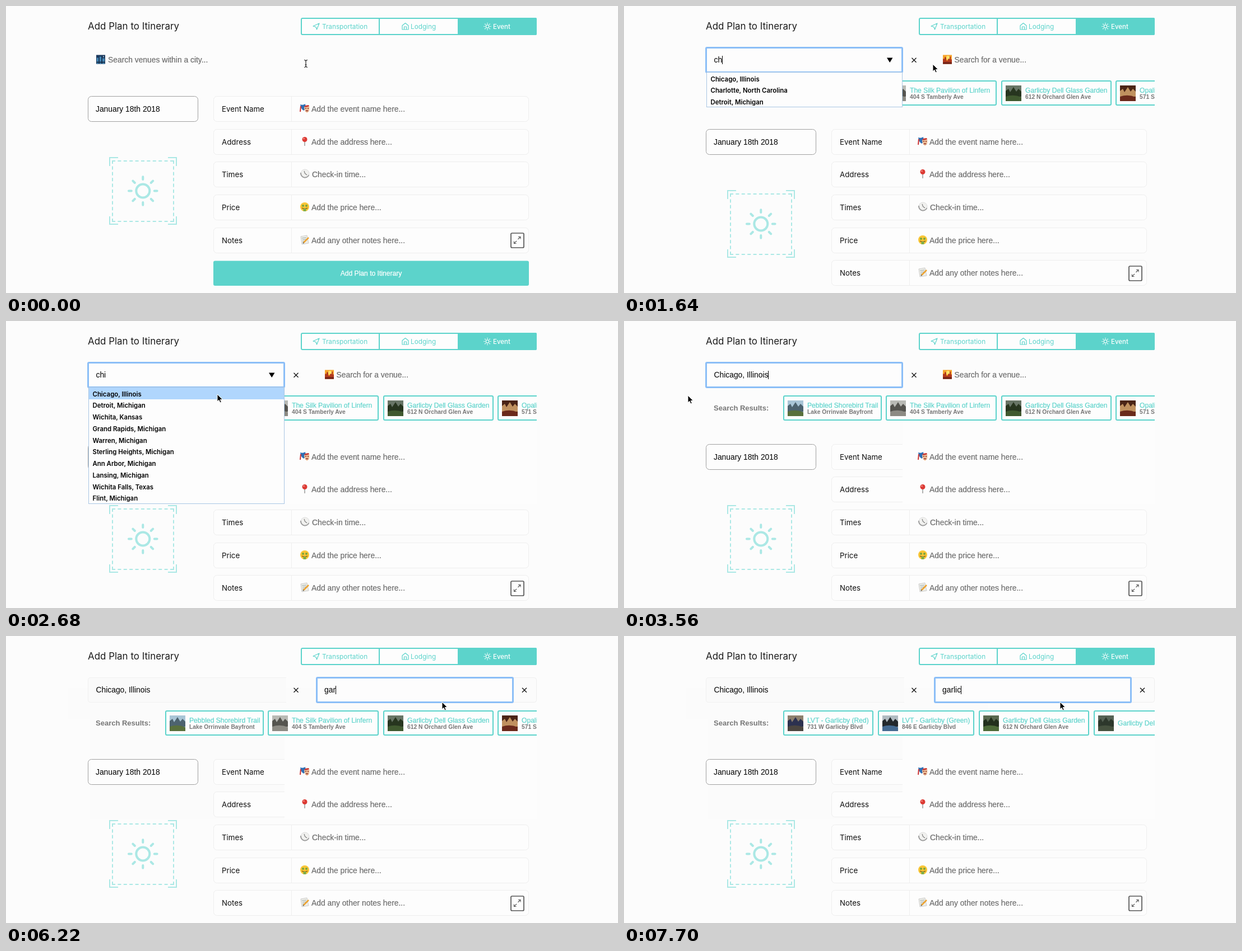
Write an HTML page that moves like this. It is 1092 px wide and 513 px high and loops after 8000 ms.

```html
<!DOCTYPE html>
<html lang="en">
<head>
<meta charset="utf-8">
<title>Add Plan to Itinerary</title>
<style>
  html, body { margin: 0; width: 100%; height: 100%; overflow: hidden; background: #fcfcfc; }
  svg { display: block; }
  text { font: 13.85px "Liberation Sans", Arial, sans-serif; white-space: pre; }
  .title { font: 16.95px Inter, sans-serif; fill: #1c1c1c; }
  .label { font: 13.3px Inter, sans-serif; fill: #111; }
  .tab { font: 11.75px Inter, sans-serif; fill: #5cd3cb; }
  .tab.on { font-weight: 500; font-size: 11.5px; fill: #fff; }
  .hint { fill: #6c6c6c; stroke: #6c6c6c; stroke-width: .2; }
  .results { font-size: 13px; font-weight: bold; fill: #777; }
  .name { font-size: 12.1px; fill: #5cd3cb; stroke: #5cd3cb; stroke-width: .2; }
  .place { font-size: 10.3px; font-weight: bold; fill: #777; }
  .option { font: 600 11.4px Inter, sans-serif; fill: #000; }
  .submit { font-size: 12.1px; fill: #fff; stroke: #fff; stroke-width: .25; text-anchor: middle; }
</style>
</head>
<body>
<svg id="stage" width="1092" height="513" viewBox="0 0 1092 513"></svg>
<script>
const LOOP = 8000, TEAL = '#5cd3cb', PALE = '#abe8e5', PAPER = '#fdfdfd';
const stage = document.getElementById('stage');
const pen = document.createElement('canvas').getContext('2d');
pen.font = '13.85px "Liberation Sans", Arial, sans-serif';

// Drawing helpers
const rect = (x, y, w, h, fill, more = '') =>
  `<rect x="${x}" y="${y}" width="${w}" height="${h}" fill="${fill}" ${more}/>`;
const line = (d, color, width = 1, more = '') =>
  `<path d="${d}" fill="none" stroke="${color}" stroke-width="${width}" ${more}/>`;
const shape = (d, fill, more = '') => `<path d="${d}" fill="${fill}" ${more}/>`;
const dot = (x, y, r, fill, more = '') =>
  `<circle cx="${x}" cy="${y}" r="${r}" fill="${fill}" ${more}/>`;
const text = (x, y, s, cls = '') =>
  `<text x="${x}" y="${y}" class="${cls}">${s.replace(/&/g, '&amp;')}</text>`;
const move = (x, y, body) => `<g transform="translate(${x} ${y})">${body}</g>`;
const round = 'stroke-linecap="round" stroke-linejoin="round"';

// Last value in the table whose time has come
const step = (t, table) => table.filter(([at]) => at <= t).pop()[1];

// Top of a form row, on whole pixels
const rowY = n => 161.5 + Math.round(n * 58.67);

function sun(x, y, r, inner, outer, color, width) {
  let rays = '';
  for (let i = 0; i < 8; i++) {
    const c = Math.cos(i * Math.PI / 4), s = Math.sin(i * Math.PI / 4);
    rays += `M${c * inner} ${s * inner}L${c * outer} ${s * outer}`;
  }
  return move(x, y, dot(0, 0, r, 'none', `stroke="${color}" stroke-width="${width}"`) +
    line(rays, color, width, round));
}

// Small pictures in a 16 px box
const icons = {
  night: rect(0, 0, 16, 16, '#1c3a5e') + shape('M1 16V5h3v11M6 16V3h3v13M11 16V6h4v10', '#4588b5') +
    line('M0 13H16', '#17304c', 2) + dot(13, 3, 1, '#cfe3ee'),
  sunset: rect(0, 0, 16, 16, '#f6a32b') + dot(9, 5, 3.5, '#ffe36a') +
    shape('M0 16V7h3V4h3v6h3V7h3V3h2v5h2v8z', '#b23a1d') + rect(0, 13, 16, 3, '#6d2018'),
  masks: shape('M0 1Q5 3 9 0Q11 9 6 12Q1 9 0 1', '#2f6fb4') + line('M1 4L0 14', '#c33', 2) +
    shape('M7 5Q11 7 16 4Q18 13 12 16Q7 13 7 5', '#efc09a') +
    line('M9 8h2M13 8h2M10 13q2-2 4 0', '#8b2b25', 1.5) + shape('M7 5Q11 7 16 4L15 2 9 3z', '#c9332c'),
  pin: line('M8 6V16', '#999', 1.5) + dot(8, 4.5, 4.5, '#dc3a34') + dot(6.5, 3, 1.3, '#f59a92'),
  clock: dot(8.5, 7.5, 7.5, '#f1f1ef', 'stroke="#ddd"') +
    line('M1 6A7.6 7.6 0 0 0 15.5 10', '#9a9a9a', 1.8) + line('M7 3L8.5 7.5L12 10', '#777', 1.1),
  money: dot(8, 8, 8, '#f9c636') + dot(5, 6, 2, '#77a33d') + dot(11, 6, 2, '#77a33d') +
    line('M3 10Q8 13 13 10', '#7a4a12', 1.3) + rect(5.5, 11, 5, 5, '#7fae4a', 'rx="1"'),
  note: shape('M1 2L12 0L15 14L3 16z', '#eeeee8', 'stroke="#bbb" stroke-width=".7"') +
    line('M3 5l8-1M4 8l7-1M4 11l6-1', '#9aa', 1) + line('M15 4L6 13', '#eda22f', 2.5) + line('M6 13l-1 1', '#444', 2)
};
const icon = (name, x, y) => move(x, y, icons[name]);

const rows = [
  ['Event Name', 'masks', 'Add the event name here...', 545],
  ['Address', 'pin', 'Add the address here...', 545],
  ['Times', 'clock', 'Check-in time...', 546],
  ['Price', 'money', 'Add the price here...', 545],
  ['Notes', 'note', 'Add any other notes here...', 545]
];

function header() {
  return text(146, 42, 'Add Plan to Itinerary', 'title') +
    rect(527, 22, 419, 29, PAPER, `rx="2" stroke="${TEAL}" stroke-width="2"`) +
    rect(806, 21, 141, 31, TEAL, 'rx="2"') + line('M666 22V51', TEAL, 2) +
    line('M559 31L548 36L553 37.5L554.5 42z', TEAL, 1.2, round) + text(564, 40.5, 'Transportation', 'tab') +
    line('M707 35L712.5 30.5L718 35V42H707zM710.5 42V37H714.5V42', TEAL, 1.2, round) + text(722, 40.5, 'Lodging', 'tab') +
    sun(859, 36.5, 2.8, 5, 6.2, '#fff', 1.2) + text(869, 40.5, 'Event', 'tab on');
}

const rowHint = ([, pic, hint, x], y) => icon(pic, 525, y + 13.5) + text(x, y + 27.3, hint, 'hint');

// The form starts on the given row of the grid
function form(first) {
  const top = rowY(first);
  let out = rect(146.5, top, 196, 45, PAPER, 'rx="6" stroke="#a0a0a0"') + text(160, top + 27, 'January 18th 2018');
  rows.forEach((row, i) => {
    const y = rowY(first + i);
    out += rect(370.5, y, 562, 45, PAPER, 'rx="6" stroke="#eee"') + line(`M509.5 ${y}v45`, '#eee') +
      text(385, y + 27, row[0], 'label') + rowHint(row, y);
  });
  return out + move(0, top - 161.5,
    rect(901, 406, 23, 26, PAPER, 'rx="2" stroke="#555" stroke-width="1.7"') +
    line('M913.5 417L918 412.5M914 412.5h4v4M911 420L906.5 424.5M906.5 420.5v4h4', '#555', 1.1) +
    line('M185 286V271H200M289 271H304V286M304 376V390H289M200 390H185V376', PALE, 2) +
    line('M189 277H299M189 385H299M190 276V386M299 276V386', PALE, 2, 'stroke-dasharray="6 4.4"') +
    sun(244.3, 330.5, 12, 20.5, 25.3, PALE, 4) +
    rect(370, 455.5, 563, 44.5, TEAL, 'rx="3"') + text(651.5, 482, 'Add Plan to Itinerary', 'submit'));
}

// Cards: left, right, text offset, name, place, thumbnail colours (back, middle, front)
const cityCards = [
  [284, 460, 43, 'Pebbled Shorebird Trail', 'Lake Orrinvale Bayfront', ['#a9c5d6', '#4d636f', '#59703c']],
  [467, 665, 43, 'The Silk Pavilion of Linfern', '404 S Tamberly Ave', ['#b9bab5', '#55544f', '#8d8b84']],
  [673, 870, 43, 'Garlicby Dell Glass Garden', '612 N Orchard Glen Ave', ['#687566', '#27351f', '#40592f']],
  [877, 1010, 43, 'Opaline Hall', '571 S Marlowind Ave', ['#4a2416', '#c0915f', '#6b2a1b']]
];
const firstCards = [
  [284, 435, 16, 'Garb & Linen Pressing', '4417 S Tolmere St'],
  [442, 573, 43, 'Mossy Garden', 'Windhollow Park'],
  [580, 741, 43, "Benny Tuck's", '26340 S Le Corbin Rd'],
  [748, 929, 43, 'Linfern Heritage Center', '35 E Harrowmont St'],
  [936, 1040, 43, 'Garlicby Inn', '']
];
const lastCards = [
  [284, 445, 43, 'LVT - Garlicby (Red)', '731 W Garlicby Blvd', ['#8d7f6d', '#2c3150', '#4b4540']],
  [453, 625, 43, 'LVT - Garlicby (Green)', '846 E Garlicby Blvd', ['#b2bcc2', '#23282c', '#456a91']],
  [633, 830, 43, 'Garlicby Dell Glass Garden', '612 N Orchard Glen Ave', ['#59684f', '#232f1c', '#4e6a38']],
  [838, 1010, 43, 'Garlicby Dell Lagoon', '', ['#566255', '#2d382c', '#46523f']]
];

const thumb = (x, [back, middle, front]) => move(x, 142,
  rect(0, 0, 28, 28, back) + shape('M0 20V10l5-4 3 6 6-9 5 8 4-5 5 5v9z', middle) + shape('M0 28V20Q14 15 28 21V28z', front));

function cardList(cards, loaded) {
  let out = '';
  for (const [x, end, dx, name, place, tones] of cards) {
    const small = dx < 20 ? 1 : 0;
    out += rect(x + 1, 134 + small, end - x - 2, 43 - small * 2, PAPER, `rx="2" stroke="${TEAL}" stroke-width="2"`) +
      (tones && loaded ? thumb(x + 8, tones) : '') +
      text(x + dx, place ? 155 - small : 159.5, name, 'name') + text(x + dx, 166 - small, place, 'place');
  }
  return text(160, 159.5, 'Search Results:', 'results') + `<g clip-path="url(#column)">${out}</g>`;
}

const anyC = ['Los Angeles, California', 'Chicago, Illinois', 'San Diego, California', 'San Jose, California',
  'San Francisco, California', 'Columbus, Ohio', 'Charlotte, North Carolina', 'Detroit, Michigan',
  'Sacramento, California', 'Oklahoma City, Oklahoma'];
const anyCh = ['Chicago, Illinois', 'Charlotte, North Carolina', 'Detroit, Michigan'];
const anyChi = ['Chicago, Illinois', 'Detroit, Michigan', 'Wichita, Kansas', 'Grand Rapids, Michigan', 'Warren, Michigan',
  'Sterling Heights, Michigan', 'Ann Arbor, Michigan', 'Lansing, Michigan', 'Wichita Falls, Texas', 'Flint, Michigan'];

function dropdown(items, picked) {
  if (!items.length) return '';
  const pitch = 20.75;
  return rect(147.5, 118.5, 349, Math.round(items.length * pitch), PAPER, 'stroke="#a9c6e4"') +
    (picked ? rect(148, 119, 348, 21, '#b0d6fd') : '') +
    items.map((s, i) => text(154.5, 134.7 + i * pitch, s, 'option')).join('');
}

const ring = (left, right) =>
  rect(left + .5, 74.5, right - left, 44, PAPER, 'rx="1.5" stroke="#8bbef7" stroke-width="3"');
const caret = (x, s) => rect(Math.round(x + pen.measureText(s).width), 89, 1, 15, '#000');
const cross = x => line(`M${x - 4} 92.7l8 8m0-8l-8 8`, '#111', 1.3);

function cityField(t) {
  const typed = step(t, [[0, ''], [900, 'c'], [1640, 'ch'], [1940, 'chi'], [2970, 'Chicago, Illinois']]);
  const focus = t >= 150 && t < 3860;
  let out = '';
  if (focus) out += ring(146, typed ? 496 : 946);
  else if (typed) out += shape('M500 74.5H151q-4.5 0-4.5 4.5V114q0 4.5 4.5 4.5H500', '#fafafa', 'stroke="#f1f1f1"');
  out += typed ? text(160.5, 101, typed) + cross(517.5)
    : icon('night', 161, 87.5) + text(182, 101, 'Search venues within a city...', 'hint');
  if (focus && !(t >= 2500 && t < 2970)) out += caret(160.5, typed);
  if (t >= 1200 && t < 3410) out += shape('M469 92.5H479.5L474.25 101z', '#000');
  return out;
}

function venueField(t) {
  if (t < 900) return '';
  const typed = step(t, [[0, ''], [5180, 'g'], [5920, 'ga'], [6220, 'gar'], [6960, 'garl'], [7260, 'garli'], [7700, 'garlic']]);
  let out = '';
  if (typed) out += rect(554.5, 74.5, 392, 44, '#fbfbfb', 'rx="4" stroke="#eee"');
  if (t >= 4890) out += ring(554, typed ? 904 : 946);
  out += typed ? text(568, 101, typed) + cross(925)
    : icon('sunset', 569, 87.5) + text(589.5, 101, 'Search for a venue...', 'hint');
  return t >= 4890 ? out + caret(568, typed) : out;
}

// Pointer path: time, x, y
const path = [[0, 535, 103], [150, 535, 103], [300, 551, 104], [2240, 551, 104], [2680, 377, 131], [3000, 377, 131],
  [3560, 114, 133], [3860, 114, 133], [4590, 681, 107], [5180, 681, 107], [5630, 778, 118], [LOOP, 778, 118]];

function pointer(t) {
  const i = path.findIndex(([at]) => at > t);
  const [t0, x0, y0] = path[i - 1], [t1, x1, y1] = path[i];
  const k = (t - t0) / (t1 - t0), e = k * k * (3 - 2 * k);
  const x = x0 + (x1 - x0) * e, y = y0 + (y1 - y0) * e;
  const beam = t < 900 || (t > 4300 && t < 5400);
  const bar = 'M-3-6.5Q0-6.5 0-4Q0-6.5 3-6.5M0-5V5M-3 6.5Q0 6.5 0 4Q0 6.5 3 6.5M-1.5 2h3';
  return move(x.toFixed(1), y.toFixed(1), beam
    ? line(bar, '#fff', 2.6) + line(bar, '#111', 1.1)
    : shape('M0 0V13L3 10.3L5 15L7.3 14L5.3 9.5H9.5z', '#000', 'stroke="#fff"'));
}

function scene(t) {
  const open = t >= 900;
  let out = '<clipPath id="column"><path d="M146 120H947V190H146z"/></clipPath>' + header();
  if (t >= 3860) out += rect(110, 93, 540, 56, '#fbfbfb') + rect(149, 118, 348, 209, '#fbfbfb');
  out += form(open ? 1 : 0);
  // The right halves of two rows lose their outlines once the long list has opened
  if (t >= 2240) {
    out += rect(497, 180, 450, 147, PAPER) + rowHint(rows[0], rowY(1)) + rowHint(rows[1], rowY(2));
  }
  if (open) out += cardList(step(t, [[0, cityCards], [6520, firstCards], [7110, lastCards]]), t < 7110 || t >= 7560);
  const list = step(t, [[0, []], [1200, anyC], [1640, anyCh], [1940, anyChi.slice(0, 3)], [2240, anyChi], [2970, []]]);
  return out + cityField(t) + venueField(t) + dropdown(list, t >= 2530) + pointer(t);
}

let shown = '';
const start = performance.now();
function tick(now) {
  const next = scene(Math.max(0, now - start) % LOOP);
  if (next !== shown) stage.innerHTML = shown = next;
  requestAnimationFrame(tick);
}
tick(start);
</script>
</body>
</html>
```
